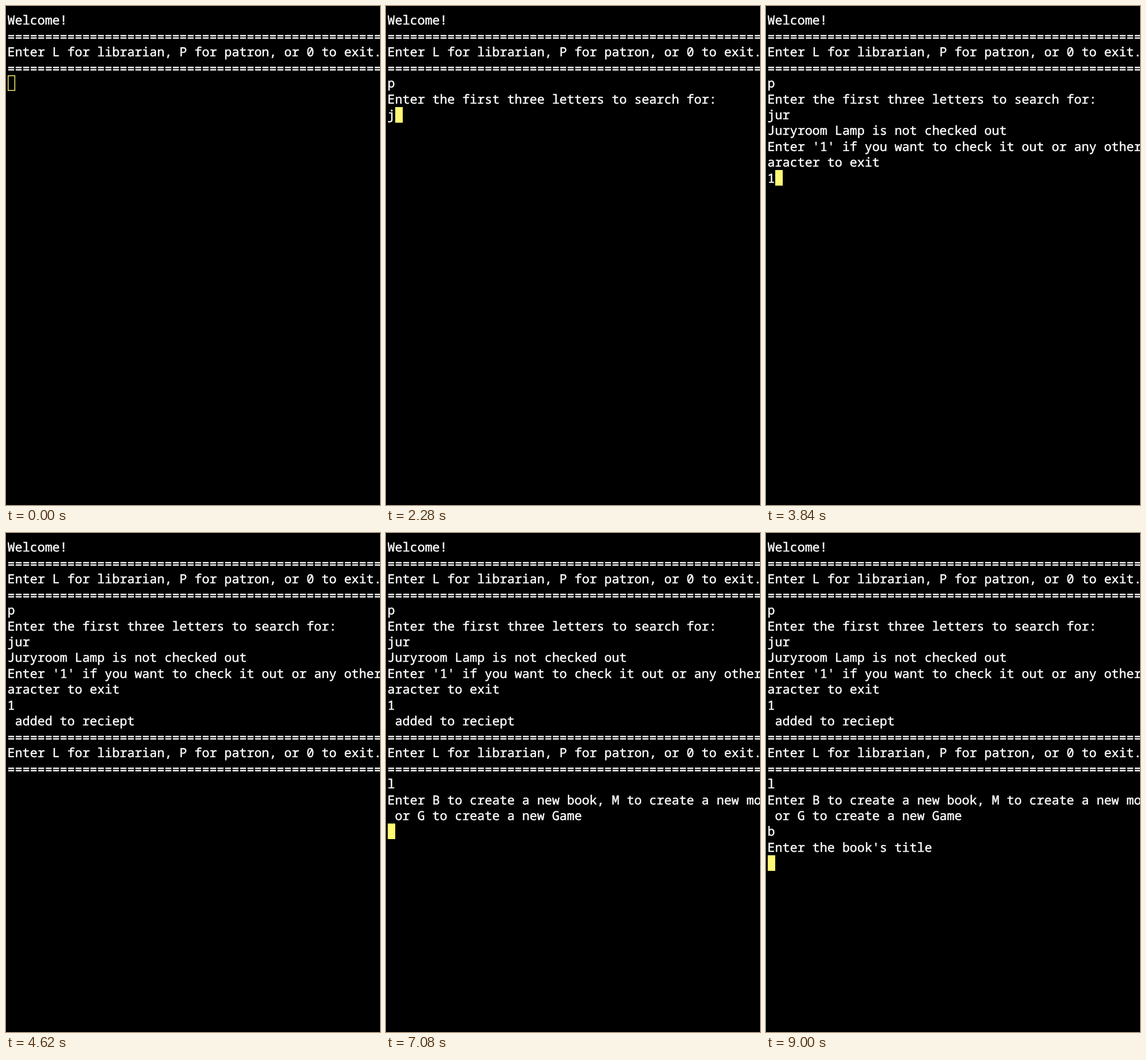
An HTML page for the animation above (9180 ms loop, 648 px wide and 864 px high).

```html
<!DOCTYPE html>
<html lang="en">
<head>
<meta charset="utf-8">
<title>Library terminal</title>
<style>
  html, body { margin: 0; width: 100%; height: 100%; overflow: hidden; background: #000; }
  svg { display: block; width: 648px; height: 864px; }
  text {
    font: 21.6px "Noto Sans Mono", "DejaVu Sans Mono", monospace;
    fill: #fff;
    stroke: #fff;
    stroke-width: 0.45;
    white-space: pre;
    text-rendering: geometricPrecision;
    font-variant-ligatures: none;
  }
  text.rule { transform: translateY(1.6px); }
  rect { fill: #fffa75; stroke: #fffa75; stroke-width: 1.4; }
  rect.unfocused { fill: none; }
</style>
</head>
<body>
<svg viewBox="0 0 648 864"><rect width="11.6" height="25.6"/></svg>
<script>
const LOOP = 9180, LEFT = 2.6, TOP = 10.5, BASELINE = 21.4;
const CELL = 12.96, PITCH = 27.36, FOCUS_AT = 540;

const rule = "=".repeat(52) + "\n";
const menu = rule + "Enter L for librarian, P for patron, or 0 to exit.\n" + rule;

// [time in ms, text added to the terminal]
const output = [
  [0, "Welcome!\n" + menu],
  [1320, "p"],
  [1620, "\nEnter the first three letters to search for:\n"],
  [2160, "j"],
  [2340, "u"],
  [2460, "r"],
  [2580, "\nJuryroom Lamp is not checked out\n" +
         "Enter '1' if you want to check it out or any other ch\naracter to exit\n"],
  [3840, "1"],
  [3960, "\n added to reciept\n" + menu],
  [6180, "l"],
  [6540, "\nEnter B to create a new book, M to create a new movie,\n" +
         " or G to create a new Game\n"],
  [7860, "b"],
  [8040, "\nEnter the book's title\n"]
];

// Spans in which the blinking cursor is dark
const dark = [[3180, 3540], [4620, 5220], [5820, 6180], [7440, 7860], [8640, 9000]];

const svg = document.querySelector("svg");
const cursor = document.querySelector("rect");
const rows = Array.from({ length: 21 }, (_, i) => {
  const row = document.createElementNS(svg.namespaceURI, "text");
  row.setAttribute("x", LEFT);
  row.setAttribute("y", TOP + i * PITCH + BASELINE);
  return svg.appendChild(row);
});
let shown;

function draw(t) {
  const text = output.filter(([at]) => at <= t).map(([, part]) => part).join("");
  if (text !== shown) {
    shown = text;
    const lines = text.split("\n");
    rows.forEach((row, i) => {
      const line = lines[i] || "";
      row.textContent = line;
      row.classList.toggle("rule", line.startsWith("="));
    });
    const last = lines.length - 1;
    cursor.setAttribute("x", Math.round(LEFT + lines[last].length * CELL) + 0.7);
    cursor.setAttribute("y", Math.round(TOP + last * PITCH) + 0.7);
  }
  cursor.classList.toggle("unfocused", t < FOCUS_AT);
  cursor.style.visibility = dark.some(([from, to]) => t >= from && t < to) ? "hidden" : "visible";
}

const start = performance.now();
function tick() {
  draw((performance.now() - start) % LOOP);
  requestAnimationFrame(tick);
}
tick();
</script>
</body>
</html>
```
